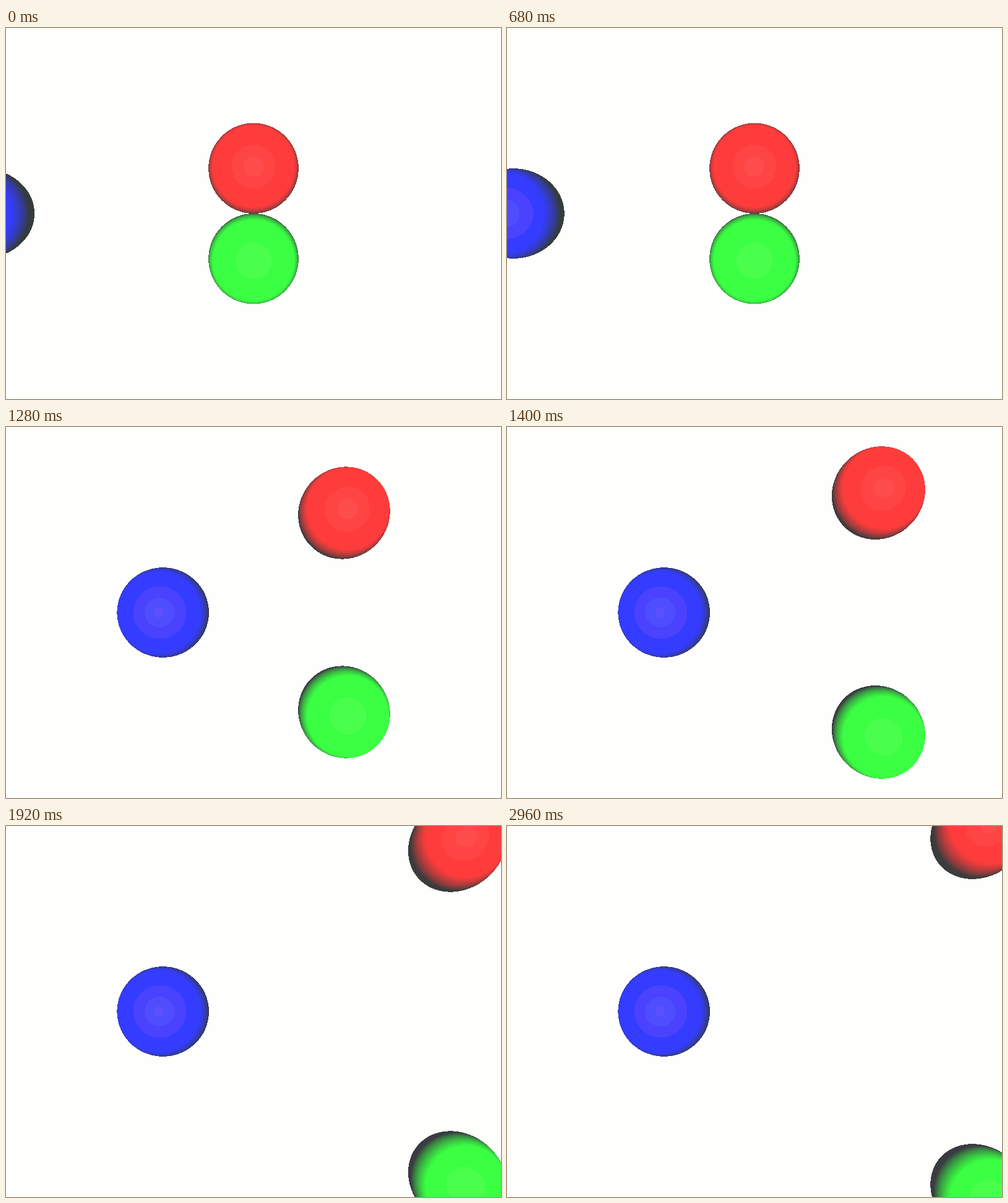
An HTML page with a canvas that plays this animation: 800 by 600 pixels, repeating every 4000 ms.

```html
<!DOCTYPE html>
<html lang="en">
<head>
<meta charset="utf-8">
<title>Colliding spheres</title>
<style>
  html, body { margin: 0; width: 100%; height: 100%; overflow: hidden; background: #fefefd; }
  canvas { display: block; }
</style>
</head>
<body>
<canvas id="stage" width="800" height="600"></canvas>
<script>
const W = 800, H = 600, LOOP = 4000, STEP = 40;
const CAMERA_Z = 10;
const FOCAL = H / 2 / Math.tan(Math.PI / 8); // 45 degree field of view
const AMBIENT = 60, DIFFUSE = 382;

// Highlight bands: [minimum normal-to-halfway cosine, colour], innermost first.
const RED = { channel: 0, bands: [[0.977, [255, 76, 76]], [0.885, [255, 68, 68]], [-1, [255, 60, 60]]] };
const GREEN = { channel: 1, bands: [[0.922, [74, 255, 76]], [-1, [58, 255, 66]]] };
const BLUE = { channel: 2, bands: [[0.995, [92, 80, 255]], [0.95, [78, 78, 255]], [0.83, [74, 66, 255]], [-1, [52, 60, 255]]] };

const ctx = document.getElementById('stage').getContext('2d');
const image = ctx.createImageData(W, H);
const pixels = new Uint32Array(image.data.buffer);
const BACKGROUND = pack([254, 254, 253]);

function pack([r, g, b]) {
  return (255 << 24 | b << 16 | g << 8 | r) >>> 0;
}

function progress(t, start, duration) {
  return Math.min(1, Math.max(0, (t - start) / duration));
}

// Screen range covered by a unit sphere along one axis.
function extent(position, origin, limit) {
  const k = FOCAL / (CAMERA_Z ** 2 - 1);
  const spread = Math.sqrt(position ** 2 + CAMERA_Z ** 2 - 1);
  return [
    Math.max(0, Math.floor(origin + k * (CAMERA_Z * position - spread))),
    Math.min(limit, Math.ceil(origin + k * (CAMERA_Z * position + spread)))
  ];
}

function shade({ channel, bands }, nx, ny, nz, view) {
  // The light shines along the z axis, so the halfway vector is view + z.
  const [vx, vy, vz] = view;
  const facing = (nx * vx + ny * vy + nz * (vz + 1)) / Math.hypot(vx, vy, vz + 1);
  const color = bands.find(([minimum]) => facing >= minimum)[1].slice();
  color[channel] = Math.min(255, AMBIENT + DIFFUSE * Math.max(0, nz));
  return pack(color);
}

// Ray-traces a unit sphere centred at (cx, cy, 0).
function drawSphere(material, cx, cy) {
  const [left, right] = extent(cx, W / 2, W);
  const [top, bottom] = extent(-cy, H / 2, H);
  const c = cx * cx + cy * cy + CAMERA_Z ** 2 - 1;
  for (let y = top; y < bottom; y++) {
    for (let x = left; x < right; x++) {
      let dx = x + 0.5 - W / 2, dy = H / 2 - y - 0.5, dz = -FOCAL;
      const length = Math.hypot(dx, dy, dz);
      dx /= length; dy /= length; dz /= length;
      const b = dx * cx + dy * cy - dz * CAMERA_Z;
      const hit = b * b - c;
      if (hit < 0) continue;
      const distance = b - Math.sqrt(hit);
      pixels[y * W + x] = shade(material,
        dx * distance - cx, dy * distance - cy, CAMERA_Z + dz * distance,
        [-dx, -dy, -dz]);
    }
  }
}

function render(t) {
  const approach = progress(t, 40, 1000) ** 4;
  const scatter = 1 - (1 - progress(t, 1040, 2000)) ** 4;
  pixels.fill(BACKGROUND);
  drawSphere(BLUE, -6 + 4 * approach, 0);
  drawSphere(RED, 5 * scatter, 1 + 3 * scatter);
  drawSphere(GREEN, 5 * scatter, -1 - 3 * scatter);
  ctx.putImageData(image, 0, 0);
}

const start = performance.now();
function tick() {
  const t = (performance.now() - start) % LOOP;
  render(Math.floor(t / STEP) * STEP);
  requestAnimationFrame(tick);
}
tick();
</script>
</body>
</html>
```
